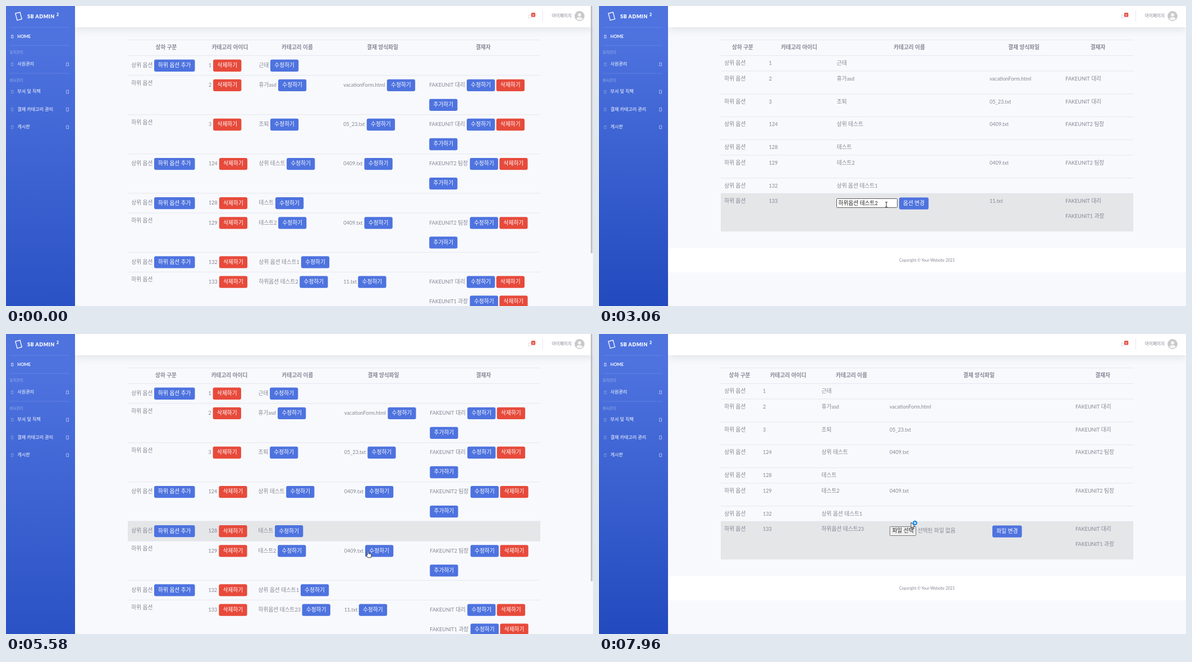
An HTML page for the animation above (8 s loop, 1046x535 px).

```html
<!DOCTYPE html>
<html lang="ko">
<head>
<meta charset="utf-8">
<title>Category admin</title>
<style>
html, body { margin: 0; width: 100%; height: 100%; overflow: hidden; background: #f8f9fc; }
svg { display: block; width: 100vw; height: 100vh; }
text { font-family: Lato, "Noto Sans CJK KR", "Noto Sans CJK JP", "Noto Sans CJK", sans-serif; fill: #858796; white-space: pre; }
tspan { font-size: 1.07em; }
.mid { text-anchor: middle; }
.bold { font-weight: 700; }
.heavy { font-weight: 900; letter-spacing: .5px; }
.white { fill: #fff; }
.dim { fill: #fff; opacity: .45; }
.dark { fill: #222; }
.line { stroke: #e3e6f0; stroke-width: .9; }
.rule { stroke: #fff; stroke-opacity: .17; stroke-width: .7; }
.tofu { fill: none; stroke-width: .7; }
.row { fill: none; }
.row.on { fill: #e5e6e8; }
.blue { fill: #4e73df; }
.blue.on { fill: #2b57d8; }
.red { fill: #e74a3b; }
.red.on { fill: #dc2f1e; }
.show { display: none; }
.show.on { display: inline; }
.bar { fill: #fff; filter: drop-shadow(0 1.3px 8px rgba(58, 59, 69, .17)); }
.card { fill: #fff; filter: drop-shadow(0 1.5px 4px rgba(0, 0, 0, .35)); }
.pointer { fill: #fff; stroke: #111; stroke-width: .8; stroke-linejoin: round; }
</style>
</head>
<body>
<svg id="stage" viewBox="0 0 1046 535" preserveAspectRatio="none"></svg>
<script>
const stage = document.getElementById('stage');
const LOOP = 8000;

// y is the visual middle of the line; Hangul runs are set slightly larger
const text = (x, y, s, cls = '', size = 9.06) =>
  `<text class="${cls}" x="${x}" y="${y + size * .36}" font-size="${size}">` +
  String(s).replace(/ ?[가-힣][가-힣 ]*/g, '<tspan>$&</tspan>') + '</text>';
const rect = (x, y, w, h, attrs = '') =>
  `<rect x="${x}" y="${y}" width="${w}" height="${h}" ${attrs}/>`;
const line = (x1, y1, x2, y2, cls) =>
  `<line class="${cls}" x1="${x1}" y1="${y1}" x2="${x2}" y2="${y2}"/>`;
const tofu = (x, y, w, h, color, opacity) =>
  rect(x - w / 2, y - h / 2, w, h, `class="tofu" stroke="${color}" stroke-opacity="${opacity}"`);
const button = (x, y, label, { w = 50.3, color = 'blue', id = '' } = {}) =>
  rect(x, y, w, 21.3, `rx="3" class="${color}" id="${id}"`) +
  text(x + w / 2, y + 10.3, label, 'mid white');
const group = (id, body) => `<g id="${id}" class="show">${body}</g>`;

const UNIT = 'FAKEUNIT 대리', UNIT2 = 'FAKEUNIT2 팀장', UNIT1 = 'FAKEUNIT1 과장';
const HEADS = ['상하 구분', '카테고리 아이디', '카테고리 이름', '결재 양식파일', '결재자'];
// gap = distance from the start of the text to the button behind it
const ROWS = [
  { id: 1, name: '근태', gap: 20.5 },
  { id: 2, name: '휴가asd', gap: 34.5, file: 'vacationForm.html', fileGap: 77.5, people: [UNIT], child: 1 },
  { id: 3, name: '조퇴', gap: 20.5, file: '05_23.txt', fileGap: 41.5, people: [UNIT], child: 1 },
  { id: 124, name: '상위 테스트', gap: 49.6, file: '0409.txt', fileGap: 37.2, people: [UNIT2] },
  { id: 128, name: '테스트', gap: 29.5 },
  { id: 129, name: '테스트2', gap: 34.6, file: '0409.txt', fileGap: 37.2, people: [UNIT2], child: 1 },
  { id: 132, name: '상위 옵션 테스트1', gap: 75.4 },
  { id: 133, name: '하위옵션 테스트2', gap: 72.8, file: '11.txt', fileGap: 26, people: [UNIT, UNIT1], child: 1 },
];
const LAST = ROWS.length - 1;

const heading = centers =>
  line(217, 60.5, 952, 60.5, 'line') + line(217, 88.3, 952, 88.3, 'line') +
  HEADS.map((h, i) => text(centers[i], 74, h, 'mid bold')).join('');
const sidebar = h => rect(0, 0, 123, h, 'fill="url(#blue)"');
const rowBack = (key, i, top, h) =>
  rect(217, top, 735, h, `class="row" id="${key}-row${i}"`) +
  (i ? line(217, top, 952, top, 'line') : '');

function listPage(key, centers, cols, lastName, lastGap) {
  let top = 88.6;
  let out = sidebar(649) + heading(centers);
  ROWS.forEach((r, i) => {
    const people = r.people || [];
    const h = people.length ? 35 + 35.05 * people.length : 35.2;
    const mid = top + 17.2, by = top + 7;
    const name = i === LAST ? lastName : r.name;
    const gap = i === LAST ? lastGap : r.gap;
    const id = part => `${key}-${part}${i}`;
    out += rowBack(key, i, top, h);
    out += r.child ? text(cols[0], top + 13.5, '하위 옵션')
      : text(cols[0], mid, '상위 옵션') + button(264, by, '하위 옵션 추가', { w: 72.6 });
    out += text(cols[1], mid, r.id) +
      button(cols[1] + 2.8 + 5.35 * String(r.id).length, by, '삭제하기', { color: 'red', id: id('del') });
    out += text(cols[2], mid, name) + button(cols[2] + gap, by, '수정하기', { id: id('name') });
    if (r.file) out += text(cols[3], mid, r.file) + button(cols[3] + r.fileGap, by, '수정하기', { id: id('file') });
    people.forEach((p, n) => {
      const dy = n * 35, bx = cols[4] + (p.length > 11 ? 72.4 : 66.8);
      out += text(cols[4], mid + dy, p) + button(bx, by + dy, '수정하기') +
        button(bx + 52.7, by + dy, '삭제하기', { color: 'red' });
    });
    if (people.length) out += button(cols[4], by + 35 * people.length, '추가하기');
    top += h;
  });
  return group(key, out + rect(1042, -4, 3.2, 445, 'rx="1.5" fill="#c1c1c1"'));
}

function editPage(key, centers, cols, lastName, file, extra) {
  let top = 88.5;
  let out = sidebar(535) + heading(centers);
  ROWS.forEach((r, i) => {
    const people = r.people || [];
    const h = people.length ? 14 + 26.9 * people.length : 27.4;
    const y = top + 13.5;
    out += rowBack(key, i, top, h) + text(cols[0], y, r.child ? '하위 옵션' : '상위 옵션') +
      text(cols[1], y, r.id) + text(cols[2], y, i === LAST ? lastName : r.name) +
      text(cols[3], y, i === LAST ? file : r.file || '') +
      people.map((p, n) => text(cols[4], y + 26.8 * n, p)).join('');
    top += h;
  });
  out += rect(123, 432, 923, 43, 'fill="#fff"') +
    text(584.5, 453.3, 'Copyright © Your Website 2021', 'mid', 7.05);
  return group(key, out + extra);
}

const nameForm =
  rect(423.5, 343.5, 108, 16, 'rx="1" fill="#fff" stroke="#5c5c5c"') +
  group('before', text(426.5, 351.3, '하위옵션 테스트2', 'dark')) +
  group('after', text(426.5, 351.3, '하위옵션 테스트23', 'dark')) +
  group('glow', rect(533.2, 339.7, 56, 24.8, 'rx="4.5" fill="#6988e4" fill-opacity=".55"')) +
  button(534.8, 341.5, '옵션 변경', { w: 52.5, id: 'save' });
const fileForm =
  rect(518.3, 343.5, 46.4, 16, 'rx="1" fill="#efefef" stroke="#767676"') +
  text(541.5, 351.2, '파일 선택', 'mid dark') + text(567.8, 351, '선택된 파일 없음') +
  button(701, 341.5, '파일 변경', { w: 52.5 });

const defs = `<defs><linearGradient id="blue" x2="0" y2="1">
  <stop offset=".1" stop-color="#4e73df"/><stop offset="1" stop-color="#224abe"/></linearGradient></defs>`;

const topbar = rect(123, 0, 923, 38, 'class="bar"') +
  tofu(933, 18.7, 4, 5.6, '#c9ccdc', 1) +
  rect(936, 12, 7.2, 7.6, 'rx="1.6" fill="#e74a3b"') + text(939.6, 15.8, '0', 'mid bold white', 5.2) +
  line(956.5, 8, 956.5, 28, 'line') + text(972.8, 17.3, '마이페이지', '', 7.2) +
  '<circle cx="1022" cy="18" r="8.9" fill="#c9c9c9"/><circle cx="1022" cy="15.8" r="3" fill="#f4f4f4"/>' +
  '<path d="M1016.3 23.6Q1017 19.8 1022 19.8T1027.7 23.6Q1022 27.6 1016.3 23.6Z" fill="#f4f4f4"/>';

const menu = [[104, '사원관리'], [153, '부서 및 직책'], [184.5, '결재 카테고리 관리'], [216, '게시판']];
const nav =
  rect(18.2, 12, 8.6, 12.6, 'fill="none" stroke="#fff" stroke-width="1.3" transform="rotate(-15 22.5 18.3)"') +
  text(38, 18.3, 'SB ADMIN', 'heavy white') + text(90, 15.3, '2', 'heavy white', 7) +
  [38, 70.3, 120].map(y => line(6.5, y, 113, y, 'rule')).join('') +
  tofu(11.2, 54.5, 3, 5, '#fff', 1) + text(20.3, 54.5, 'HOME', 'bold white', 7.6) +
  text(6.5, 83.2, '유저관리', 'dim', 6.1) + text(6.5, 133, '회사관리', 'dim', 6.1) +
  menu.map(([y, s]) => tofu(11.2, y, 3.2, 5, '#fff', .4) + text(20.3, y - .3, s, 'white', 7.6) +
    tofu(109.6, y, 3.6, 5.6, '#fff', .75)).join('');

const dialog = group('dialog',
  rect(423, -12, 223.5, 87, 'rx="7" class="card"') +
  text(434, 14.3, 'localhost 내용:', 'bold dark', 8.8) + text(434, 30.5, '수정 성공', '', 7.7) +
  rect(599.8, 44.8, 36, 19.2, 'rx="1.5" fill="#068b71"') + text(617.8, 54.3, '확인', 'mid bold white', 7.2));

const cursor = '<g id="cursor">' +
  group('click', '<circle r="6" fill="#cfc02a" fill-opacity=".62"/>') +
  group('arrow', '<path class="pointer" d="M0 0V10.2L2.3 8.1 3.8 11.6 5.4 10.9 3.9 7.5H7Z"/>') +
  group('hand', '<path class="pointer" d="M-1 1.2Q0-.8 1 1.2V5L4.8 5.8Q6.4 6.2 6.2 8L5.4 12.3H-.4L-3.2 8Q-2.8 6.4-1 8Z"/>') +
  group('beam', '<path d="M-2-4.5Q0-4.5 0-3.5V3.5Q0 4.5-2 4.5M2-4.5Q0-4.5 0-3.5M0 3.5Q0 4.5 2 4.5" fill="none" stroke="#111" stroke-width=".9"/>') +
  group('busy', '<circle cx="7" cy="1" r="3.1" fill="#bfe3fb" stroke="#1f8be0" stroke-width="2.2"/>') +
  '</g>';

stage.innerHTML = defs + rect(0, 0, 1046, 535, 'fill="#f8f9fc"') + topbar +
  listPage('list', [285.5, 399, 519, 671, 850.3], [223.3, 361, 450.5, 601.3, 754.2], '하위옵션 테스트2', 72.8) +
  editPage('rename', [256, 356.5, 553, 757, 889], [223.3, 302.8, 423.8, 696, 831.3], '', '11.txt', nameForm) +
  listPage('renamed', [285, 398, 519.5, 672.5, 850.8], [223.3, 360.5, 449.6, 602.8, 755.3], '하위옵션 테스트23', 78) +
  editPage('upload', [250.5, 337, 450, 677, 897.5], [223.3, 292, 396.6, 517.8, 849], '하위옵션 테스트23', '', fileForm) +
  nav + dialog + cursor;

// id: [from, to, from, to, ...] in ms
const SPANS = {
  list: [0, 2180], rename: [2180, 5320], renamed: [5320, 6260], upload: [6260, LOOP],
  'list-row7': [270, 2180], 'list-del7': [900, 1190], 'list-name7': [1700, 2180],
  'rename-row7': [2580, 5320], before: [0, 3270], after: [3270, LOOP],
  save: [3690, 5320], glow: [3960, 5320], dialog: [4110, 5240],
  'renamed-row3': [5440, 5510], 'renamed-row4': [5510, 5650], 'renamed-row5': [5650, 5780],
  'renamed-file5': [5650, 5720], 'renamed-row6': [5780, 5880], 'renamed-row7': [5880, 6260],
  'renamed-file7': [5910, 6260], 'upload-row7': [6500, LOOP],
  click: [1980, 2180, 3100, 3250, 3900, 4040, 5180, 5300, 6080, 6150],
  arrow: [200, 900, 1190, 1310, 2180, 2780, 4110, 4980, 5300, 5570, 5720, 5900, 6150, LOOP],
  hand: [900, 1190, 1680, 2180, 3690, 4110, 4980, 5300, 5570, 5720, 5900, 6150],
  beam: [1310, 1680, 2780, 3690], busy: [7800, LOOP],
};
const parts = Object.entries(SPANS).map(([id, spans]) => [document.getElementById(id), spans]);
const pointer = document.getElementById('cursor');

const PATH = [
  [0, 445, 545], [200, 445, 540], [600, 424, 512], [980, 408, 499], [1050, 408, 499],
  [1840, 545, 501], [1910, 544, 500], [2080, 535.5, 498], [2370, 535.5, 496], [2850, 512, 354],
  [3470, 512, 354], [3840, 562, 352], [4040, 560, 350], [4250, 545, 325], [4320, 545, 322],
  [4720, 672, 75], [5050, 626, 52], [5300, 626, 52], [5580, 645, 386.5], [5980, 659, 485.5],
  [6260, 659, 485.5], [6560, 583, 384], [6690, 583, 384], [7560, 570, 342], [7600, 570, 342],
  [7880, 556, 336], [LOOP, 556, 336],
];

function place(t) {
  const i = PATH.findIndex(p => p[0] > t);
  const [t0, x0, y0] = PATH[i - 1], [t1, x1, y1] = PATH[i];
  const u = (t - t0) / (t1 - t0), e = u * u * (3 - 2 * u);
  return [x0 + (x1 - x0) * e, y0 + (y1 - y0) * e];
}
const within = (spans, t) => spans.some((s, i) => i % 2 === 0 && t >= s && t < spans[i + 1]);

const start = performance.now();
function draw() {
  const t = Math.max(0, performance.now() - start) % LOOP;
  for (const [el, spans] of parts) el.classList.toggle('on', within(spans, t));
  pointer.setAttribute('transform', `translate(${place(t)})`);
  requestAnimationFrame(draw);
}
draw();
</script>
</body>
</html>
```
